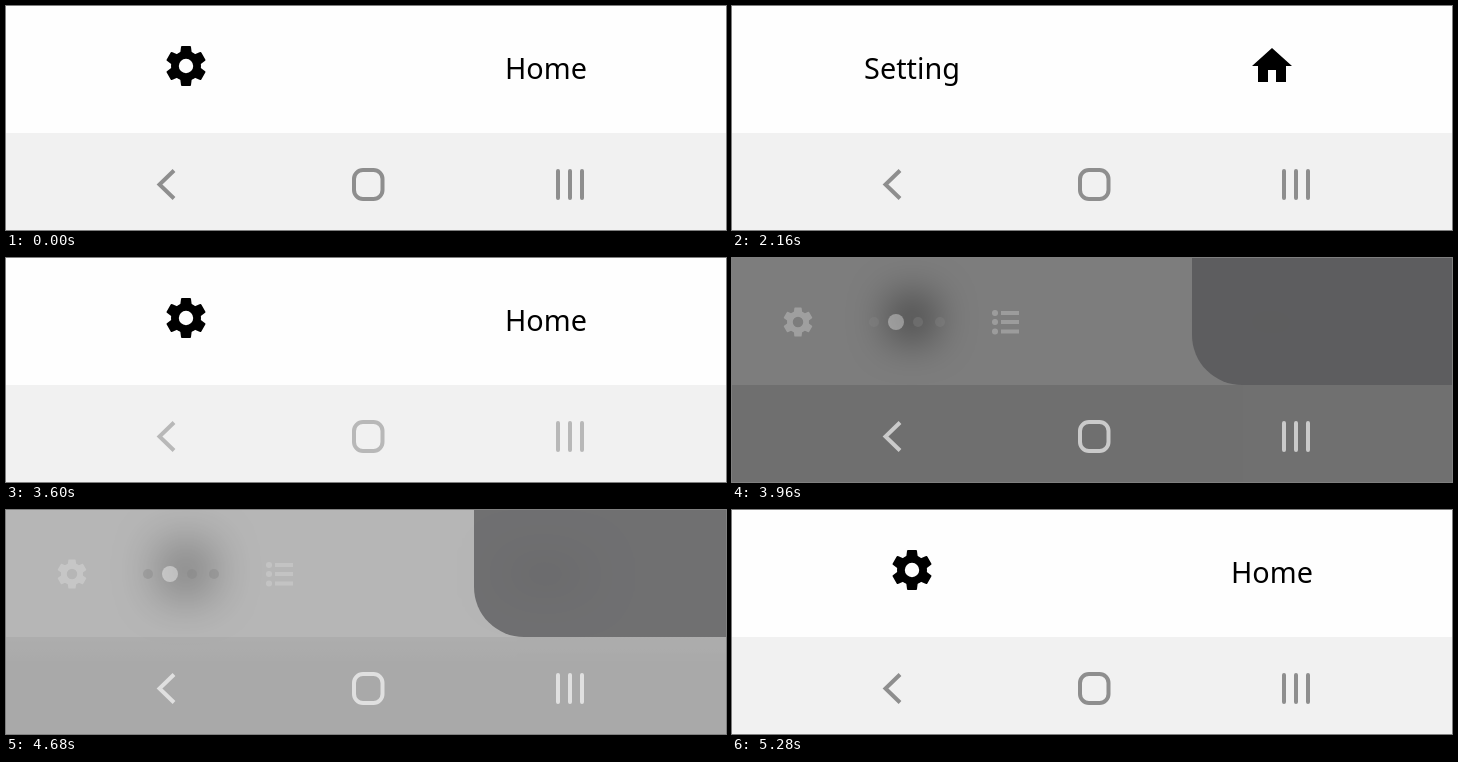
Write an HTML page that moves like this. It is 720 by 224 pixels and loops after 5.4 s.

```html
<!DOCTYPE html>
<html lang="en">
<head>
<meta charset="utf-8">
<title>Bottom bar and edge panel</title>
<style>
html, body { margin: 0; width: 100%; height: 100%; overflow: hidden; background: #fefefe; }
svg { display: block; width: 720px; height: 224px; }
text { font: 28.8px "Noto Sans", "Open Sans", sans-serif; text-anchor: middle; }

/* One picture every 120 ms, so every track holds its value between stops */
.track { animation: 5400ms step-end infinite; }
.ripple { fill: #000; opacity: 0; }
.left { animation-name: ripple-left; }
.right { animation-name: ripple-right; }
.home { animation-name: home; }
.setting { animation-name: setting; }
.blur { animation-name: blur; }
.dim { animation-name: dim; }
.soft { animation-name: soft; }
.controls { animation-name: controls; }
.panel { animation-name: panel; }
.keys { animation-name: keys; fill: none; stroke-width: 4; stroke-linecap: round; }

@keyframes ripple-left {
  0%, 37.7%, 100% { opacity: 0; cx: 180px; cy: 60px; r: 200px; }
  28.88% { opacity: .12; cx: 203px; cy: 70px; r: 134px; }
  31.1% { opacity: .12; cx: 188px; cy: 63px; r: 185px; }
  33.3% { opacity: .08; cx: 180px; cy: 60px; r: 200px; }
  35.5% { opacity: .03; cx: 180px; cy: 60px; r: 200px; }
}
@keyframes ripple-right {
  0%, 53.3%, 100% { opacity: 0; cx: 540px; cy: 60px; r: 200px; }
  44.4% { opacity: .12; cx: 548px; cy: 70px; r: 134px; }
  46.6% { opacity: .12; cx: 543px; cy: 63px; r: 185px; }
  48.8% { opacity: .08; cx: 540px; cy: 60px; r: 200px; }
  51.1% { opacity: .03; cx: 540px; cy: 60px; r: 200px; }
}
@keyframes home {
  0%, 55.5%, 100% { opacity: 1; }
  31.1% { opacity: .9; }
  33.3% { opacity: .5; }
  35.5% { opacity: .15; }
  37.7% { opacity: 0; }
  46.6% { opacity: .1; }
  48.8% { opacity: .4; }
  51.1% { opacity: .75; }
  53.3% { opacity: .96; }
}
@keyframes setting {
  0%, 53.3%, 100% { opacity: 0; }
  31.1% { opacity: .1; }
  33.3% { opacity: .4; }
  35.5% { opacity: .75; }
  37.7% { opacity: .96; }
  39.9% { opacity: 1; }
  46.6% { opacity: .9; }
  48.8% { opacity: .5; }
  51.1% { opacity: .15; }
}
@keyframes blur {
  0%, 95.5%, 100% { filter: none; }
  68.8% { filter: blur(7px); }
  71.1% { filter: blur(16px); }
  73.3% { filter: blur(22px); }
  75.5% { filter: blur(26px); }
  91.1% { filter: blur(16px); }
  93.3% { filter: blur(6px); }
}
@keyframes dim {
  0%, 91.1%, 100% { opacity: 0; }
  68.8% { opacity: .3; }
  71.1% { opacity: .65; }
  73.3% { opacity: .9; }
  75.5% { opacity: 1; }
  86.6% { opacity: .5; }
  88.8% { opacity: .01; }
}
@keyframes soft {
  0%, 93.3%, 100% { opacity: 0; }
  86.6% { opacity: .6; }
  88.8% { opacity: 1; }
  91.1% { opacity: .4; }
}
@keyframes controls {
  0%, 88.8%, 100% { opacity: 0; }
  73.3% { opacity: .35; }
  75.5% { opacity: .8; }
  79.9% { opacity: 1; }
  86.6% { opacity: .4; }
}
@keyframes panel {
  0%, 95.5%, 100% { opacity: 0; transform: translateX(585px); }
  68.8% { opacity: .35; transform: translateX(590px); }
  71.1% { opacity: .75; transform: translateX(505px); }
  73.3% { opacity: .95; transform: translateX(460px); }
  75.5% { opacity: 1; transform: translateX(444px); }
  86.6% { opacity: .78; transform: translateX(468px); }
  88.8% { opacity: .5; transform: translateX(505px); }
  91.1% { opacity: .28; transform: translateX(545px); }
  93.3% { opacity: .1; transform: translateX(572px); }
}
@keyframes keys {
  0%, 97.7%, 100% { stroke: #8e8e8e; filter: none; }
  66.6% { stroke: #b8b8b8; filter: none; }
  68.8% { stroke: #e4e4e4; filter: none; }
  71.1% { stroke: #d8d8d8; filter: none; }
  73.3% { stroke: #cacaca; filter: none; }
  75.5% { stroke: #c0c0c0; filter: none; }
  86.6% { stroke: #e0e0e0; filter: none; }
  88.8% { stroke: #fafafa; filter: drop-shadow(0 1px 1.5px rgba(0, 0, 0, .22)); }
  91.1% { stroke: #d6d6d6; filter: none; }
  93.3% { stroke: #aeaeae; filter: none; }
  95.5% { stroke: #929292; filter: none; }
}
</style>
</head>
<body>
<svg viewBox="0 0 720 224">
  <defs>
    <path id="tooth" d="M-6-11L-5-19.2Q-4.9-20-4-20H4Q4.9-20 5-19.2L6-11z"/>
    <g id="pair">
      <use href="#tooth"/>
      <use href="#tooth" transform="rotate(180)"/>
    </g>
    <g id="gear">
      <path fill-rule="evenodd" d="M-15 0a15 15 0 1 0 30 0a15 15 0 1 0-30 0zM-7.2 0a7.2 7.2 0 1 0 14.4 0a7.2 7.2 0 1 0-14.4 0z"/>
      <use href="#pair"/>
      <use href="#pair" transform="rotate(60)"/>
      <use href="#pair" transform="rotate(120)"/>
    </g>
    <g id="row">
      <circle cx="263" r="3"/>
      <rect x="269" y="-2" width="18" height="4"/>
    </g>
    <linearGradient id="edge" x2="0" y2="1">
      <stop stop-color="#fcfcfc"/>
      <stop offset="1" stop-color="#f4f4f4"/>
    </linearGradient>
  </defs>

  <rect width="720" height="224" fill="#fefefe"/>
  <circle class="track ripple left"/>
  <circle class="track ripple right"/>
  <rect y="127" width="720" height="97" fill="#f1f1f1"/>
  <rect class="track soft" y="127" width="720" height="24" fill="url(#edge)"/>

  <g class="track blur">
    <g class="track home">
      <use href="#gear" x="180" y="60"/>
      <text x="540" y="72.5">Home</text>
    </g>
    <g class="track setting">
      <text x="180" y="72.5">Setting</text>
      <path d="M536 76V64h8v12h10V60h6L540 42L520 60h6v16z"/>
    </g>
  </g>

  <g class="track dim">
    <rect width="720" height="127" opacity=".57"/>
    <rect y="127" width="720" height="97" opacity=".6"/>
  </g>

  <g class="track controls">
    <use href="#gear" transform="translate(66 64) scale(.73)" fill="#e0e0e0"/>
    <g fill="#868686">
      <circle cx="142" cy="64" r="5"/>
      <circle cx="186" cy="64" r="5"/>
      <circle cx="208" cy="64" r="5"/>
    </g>
    <circle cx="164" cy="64" r="8" fill="#fff"/>
    <g fill="#d8d8d8">
      <use href="#row" y="55"/>
      <use href="#row" y="64"/>
      <use href="#row" y="73.5"/>
    </g>
  </g>

  <path class="track panel" d="M0 0V77A50 50 0 0 0 50 127H300V0z" fill="#5c5c5e"/>

  <g class="track keys">
    <path d="M168 164.5L153.5 178.5L168 192.5" stroke-linecap="butt"/>
    <rect x="348" y="164" width="28.5" height="29" rx="9"/>
    <path d="M552 165v27M564 165v27M576 165v27"/>
  </g>
</svg>
</body>
</html>
```
